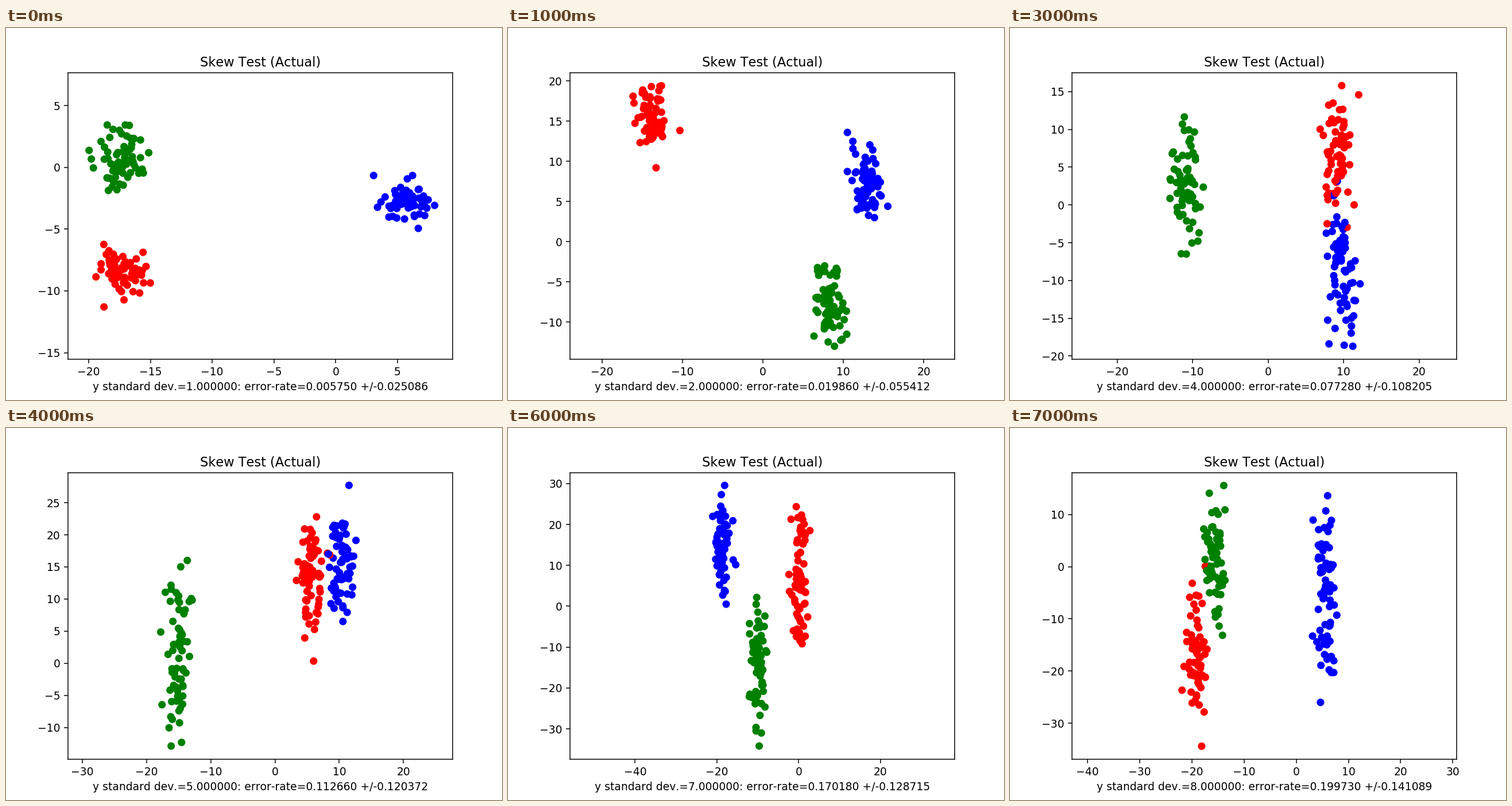
Animation of 864x648 px, one loop 8 s. Source, as a matplotlib script:

```python
import numpy as np
import matplotlib.pyplot as plt
from matplotlib.animation import FuncAnimation

# Plain letter spacing, without pair kerning.
plt.rcParams["text.kerning_factor"] = 6

DPI = 135
WIDTH, HEIGHT = 864, 648
LEFT, RIGHT, BOTTOM, TOP = 0.125, 0.9, 0.11, 0.88
CLUSTER_SIZE = 67
COLORS = ("green", "red", "blue")

# Each scene: lower left corner of the view, pixels per unit, error rate and
# its deviation, then (x centre, lowest y, highest y) of each cluster.
SCENES = [
    ((-21.67, -15.52), 21.52, 0.005750, 0.025086,
     ((-17.4, -1.87, 3.43), (-17.25, -11.3, -6.24), (5.75, -4.94, -0.66))),
    ((-24, -14.6), 14, 0.019860, 0.055412,
     ((8.3, -13, -3), (-13.8, 9.2, 19.4), (12.9, 3, 13.6))),
    ((-31.32, -21.26), 10.37, 0.041030, 0.081470,
     ((20.1, 8.8, 24.7), (15.9, -5.56, 6.6), (-17.9, -19.05, -5.65))),
    ((-25.97, -20.40), 13.16, 0.077280, 0.108205,
     ((-10.85, -6.5, 11.65), (9.2, -2.95, 15.8), (9.75, -18.7, 3.15))),
    ((-32.24, -14.93), 11.185, 0.112660, 0.120372,
     ((-15.1, -12.9, 16), (5.65, 0.33, 22.8), (10.4, 6.5, 27.7))),
    ((-40, -30.7), 8.5, 0.142910, 0.126038,
     ((16.7, -28, 1), (-12.7, -23, 5.6), (3.8, -3, 25.4))),
    ((-55.94, -37.4), 7.12, 0.170180, 0.128715,
     ((-10, -34.2, 2.15), (0.25, -9.2, 24.35), (-18.7, 0.5, 29.55))),
    ((-42.98, -36.87), 9.09, 0.199730, 0.141089,
     ((-15.6, -13.15, 15.55), (-19.1, -34.4, 0.05), (5.6, -26, 13.6))),
]

fig, ax = plt.subplots(figsize=(WIDTH / DPI, HEIGHT / DPI), dpi=DPI)
fig.subplots_adjust(left=LEFT, right=RIGHT, bottom=BOTTOM, top=TOP)


def blob(rng, x_center, low, high):
    """Normal cloud: unit deviation in x, stretched to span low..high in y."""
    x, y = rng.standard_normal((2, CLUSTER_SIZE))
    x = (x - x.mean()) / x.std()
    y = (y - y.min()) / np.ptp(y)
    return np.column_stack([x_center + x, low + (high - low) * y])


def draw(i):
    (x0, y0), scale, error, deviation, clusters = SCENES[i]
    rng = np.random.default_rng(40 + i)
    points = np.vstack([blob(rng, *c) for c in clusters])
    colors = np.repeat(COLORS, CLUSTER_SIZE)
    order = rng.permutation(len(points))

    ax.clear()
    ax.scatter(*points[order].T, s=36, c=colors[order], linewidths=1)
    ax.set_xlim(x0, x0 + (RIGHT - LEFT) * WIDTH / scale)
    ax.set_ylim(y0, y0 + (TOP - BOTTOM) * HEIGHT / scale)
    ax.set_title("Skew Test (Actual)")
    ax.set_xlabel(f"y standard dev.={i + 1:.6f}: "
                  f"error-rate={error:.6f} +/-{deviation:.6f}")
    return ax.get_children()


anim = FuncAnimation(fig, draw, frames=len(SCENES), init_func=lambda: draw(0),
                     interval=1000, repeat=True, repeat_delay=0)
plt.show()
```
